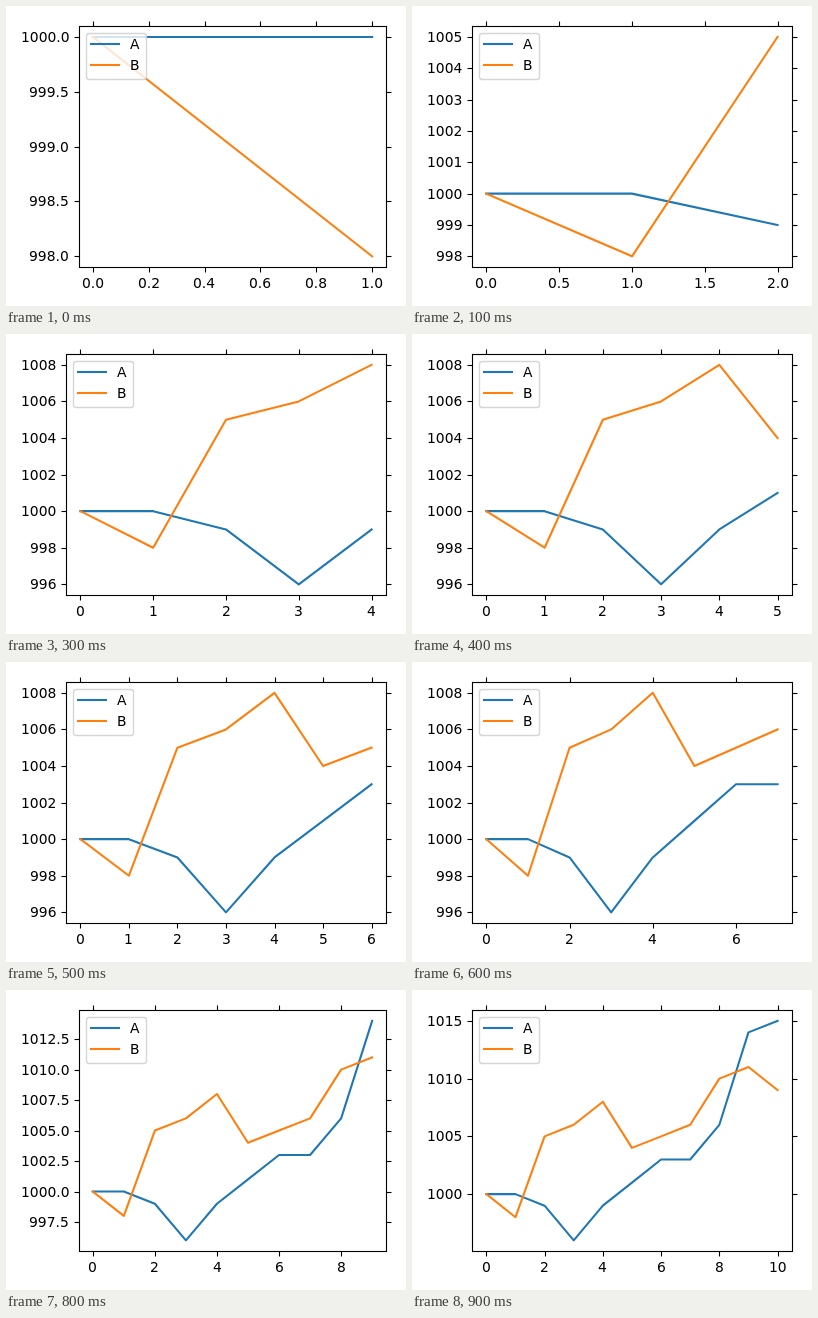
An HTML page with a canvas for the animation above (1000 ms loop, 400x300 px).

```html
<!DOCTYPE html>
<html lang="en">
<head>
<meta charset="utf-8">
<title>Two growing series</title>
<style>
html, body { margin: 0; width: 100%; height: 100%; overflow: hidden; background: #fff; }
canvas { display: block; }
</style>
</head>
<body>
<canvas id="chart" width="400" height="300"></canvas>
<script>
const ctx = document.getElementById('chart').getContext('2d');
const series = [
  { name: 'A', color: '#1f77b4', data: [1000, 1000, 999, 996, 999, 1001, 1003, 1003, 1006, 1014, 1015] },
  { name: 'B', color: '#ff7f0e', data: [1000, 998, 1005, 1006, 1008, 1004, 1005, 1006, 1010, 1011, 1009] }
];
const TOP = 19.86, BOTTOM = 261.3, RIGHT = 380.14;
const crisp = v => Math.round(v) + 0.5;

// Data range with 5% margins and a round tick step
function makeAxis(min, max, bins) {
  const pad = (max - min) * 0.05, lo = min - pad, hi = max + pad;
  const raw = (hi - lo) / bins;
  const step = [0.1, 0.2, 0.25, 0.5, 1, 2, 2.5, 5, 10].find(s => s >= raw);
  const digits = step % 1 ? 1 : 0;
  const ticks = [];
  for (let i = Math.ceil(lo / step); i * step <= hi; i++) ticks.push(i * step);
  return { lo, hi, digits, ticks };
}

function line(points, color, width, cap = 'butt') {
  ctx.strokeStyle = color;
  ctx.lineWidth = width;
  ctx.lineCap = cap;
  ctx.lineJoin = 'round';
  ctx.beginPath();
  points.forEach(p => ctx.lineTo(...p));
  ctx.stroke();
}

const tick = (x, y, dx, dy) => line([[x, y], [x + dx, y + dy]], '#000', 1.11);

function drawLegend(left) {
  const x = left + 6.94;
  ctx.beginPath();
  ctx.roundRect(crisp(x), 27.5, 60, 46, 2.78);
  ctx.fillStyle = 'rgba(255,255,255,.8)';
  ctx.fill();
  ctx.strokeStyle = 'rgba(204,204,204,.8)';
  ctx.lineWidth = 1.39;
  ctx.stroke();
  series.forEach((s, i) => {
    const y = 38 + 21 * i, start = Math.round(x + 5.56);
    line([[start, y], [start + 28, y]], s.color, 2.08, 'square');
    ctx.fillStyle = '#000';
    ctx.fillText(s.name, start + 39, y + 5);
  });
}

function draw(count) {
  const values = series.flatMap(s => s.data.slice(0, count));
  const xa = makeAxis(0, count - 1, 7);
  const ya = makeAxis(Math.min(...values), Math.max(...values), 8);
  const left = ya.digits ? 72.8 : 59.8;
  const px = v => left + (v - xa.lo) / (xa.hi - xa.lo) * (RIGHT - left);
  const py = v => BOTTOM - (v - ya.lo) / (ya.hi - ya.lo) * (BOTTOM - TOP);

  ctx.fillStyle = '#fff';
  ctx.fillRect(0, 0, 400, 300);
  ctx.font = '13.89px "DejaVu Sans", sans-serif';
  ctx.fillStyle = '#000';

  for (const v of xa.ticks) {
    const x = crisp(px(v)), label = v.toFixed(xa.digits);
    tick(x, crisp(BOTTOM), 0, 5);
    tick(x, crisp(TOP), 0, -5);
    ctx.fillText(label, Math.round(px(v) - ctx.measureText(label).width / 2), 282);
  }
  for (const v of ya.ticks) {
    const y = crisp(py(v)), label = v.toFixed(ya.digits);
    tick(crisp(left), y, -5, 0);
    tick(crisp(RIGHT), y, 5, 0);
    ctx.fillText(label, Math.round(left - 9.72 - ctx.measureText(label).width), y + 4.5);
  }

  for (const s of series) {
    const data = s.data.slice(0, count);
    const flat = data.every(v => v === data[0]);
    line(data.map((v, i) => [px(i), flat ? Math.round(py(v)) : py(v)]), s.color, 2.08, 'square');
  }

  ctx.strokeStyle = '#000';
  ctx.lineWidth = 1.11;
  ctx.lineJoin = 'miter';
  ctx.strokeRect(crisp(left), crisp(TOP), crisp(RIGHT) - crisp(left), crisp(BOTTOM) - crisp(TOP));
  drawLegend(left);
}

// One more point every 100 ms
const start = performance.now();
function frame() {
  const t = (performance.now() - start) % 1000;
  draw(2 + Math.floor(t / 100));
  requestAnimationFrame(frame);
}
frame();
</script>
</body>
</html>
```
